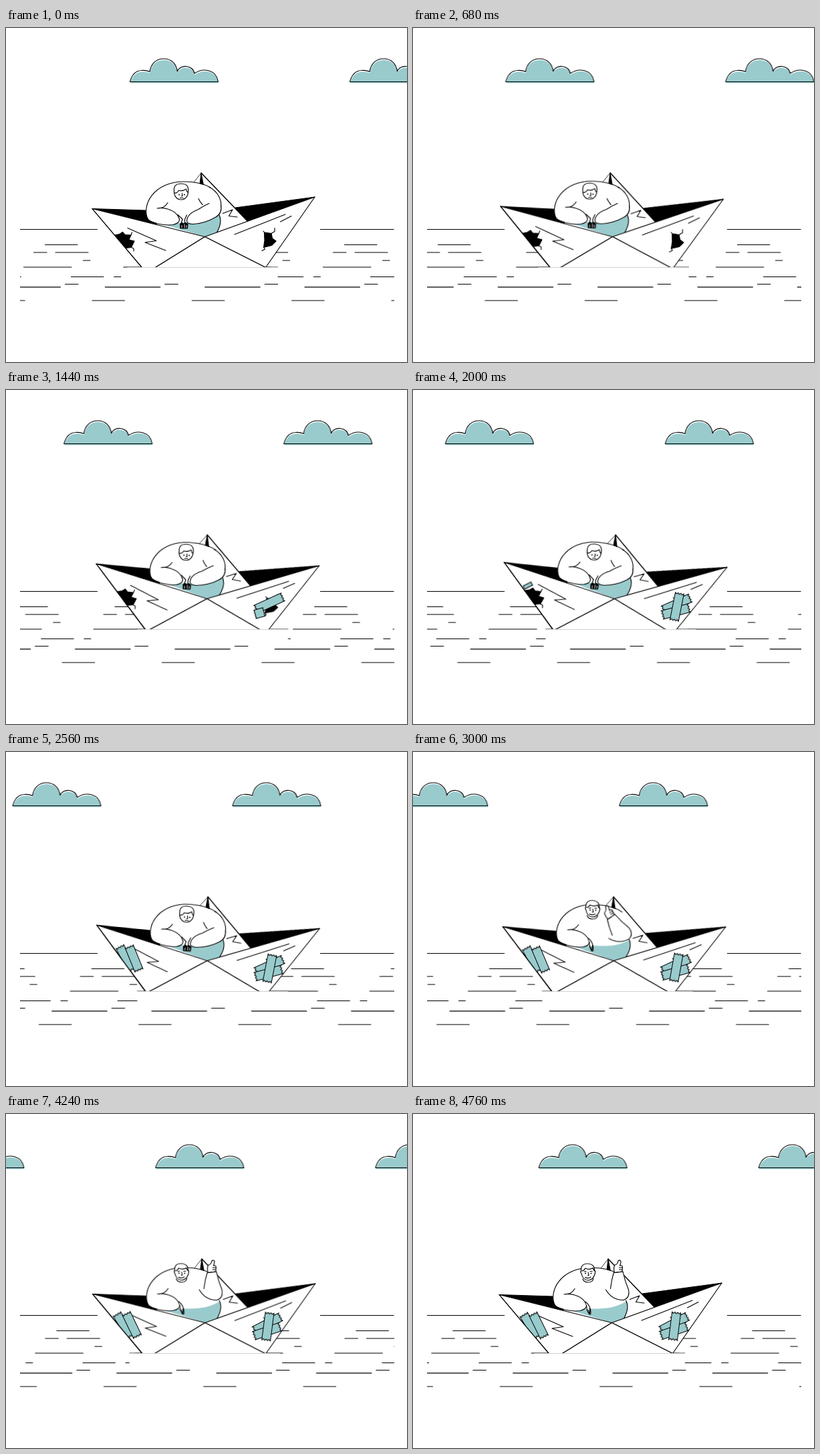
Animation, 600 px wide and 500 px high, one loop 4800 ms. Source, as an HTML page without scripts:

```html
<!DOCTYPE html>
<html lang="en">
<head>
<meta charset="utf-8">
<title>Paper boat</title>
<style>
  html, body { margin: 0; width: 100%; height: 100%; overflow: hidden; background: #fff; }
  svg { display: block; width: 600px; height: 500px; }
  .ink { fill: none; stroke: #000; stroke-width: 1.15; stroke-linejoin: round; stroke-linecap: round; }
  .paper { fill: #fff; }
  .teal { fill: #99cbcd; }
  .flat { stroke: none; }
  .black { fill: #000; }
  .thin { stroke-width: .8; }

  .clouds, .waves, .boat, .water, .working, .proud, .raise, .tape path {
    animation: 4.8s linear infinite;
  }
  .clouds { animation-name: clouds; }
  .waves { animation-name: waves; }
  .boat { animation-name: rock; transform-origin: 299.5px 366px; }
  .water { animation-name: water; }
  .working { animation-name: leave; animation-timing-function: step-end; }
  .proud { animation-name: arrive; animation-timing-function: step-end; }
  .raise { animation-name: raise; transform-origin: 317px 272px; }
  .tape path { vector-effect: non-scaling-stroke; }
  .t1 path { animation-name: t1; }
  .t2 path { animation-name: t2; }
  .t3 path { animation-name: t3; }
  .t4 path { animation-name: t4; }
  .t5 path { animation-name: t5; }

  @keyframes clouds { to { transform: translateX(-329px); } }
  @keyframes waves { to { transform: translateX(-149.333px); } }
  @keyframes rock {
    0% { transform: rotate(0); animation-timing-function: cubic-bezier(.33, 0, .67, 1); }
    41% { transform: rotate(4.25deg); animation-timing-function: cubic-bezier(.42, 0, .58, 1); }
    100% { transform: rotate(0); }
  }
  @keyframes water {
    0%, 100% { transform: none; }
    14.2% { transform: translateX(6px); }
    30% { transform: translateX(15.5px); }
    41% { transform: translateX(17.5px); }
    53.3% { transform: translateX(15.5px); }
    72.5% { transform: translateX(9px); }
    88.3% { transform: translateX(3.8px); }
  }
  @keyframes leave { 0% { opacity: 1; } 60%, 100% { opacity: 0; } }
  @keyframes arrive { 0% { opacity: 0; } 60%, 100% { opacity: 1; } }
  @keyframes raise { 0%, 60% { transform: rotate(-55deg); } 66%, 100% { transform: none; } }
  @keyframes t1 { 0%, 22% { transform: scaleX(0); } 28%, 100% { transform: none; } }
  @keyframes t2 { 0%, 28.5% { transform: scaleX(0); } 33%, 100% { transform: none; } }
  @keyframes t3 { 0%, 34% { transform: scaleX(0); } 39%, 100% { transform: none; } }
  @keyframes t4 { 0%, 41% { transform: scaleX(0); } 46%, 100% { transform: none; } }
  @keyframes t5 { 0%, 47% { transform: scaleX(0); } 52%, 100% { transform: none; } }
</style>
</head>
<body>
<svg viewBox="0 0 600 500" class="ink">
  <defs>
    <path id="puff" d="M185.5 80.5Q190 64 203 63.5Q210 63 215 65.5C217 53 225 46 236 46C248 46 255 54 256.5 65C260 54 280 55 282 68C295 59 315 62 317.500 80.500Z"/>
    <g id="cloud">
      <use href="#puff" class="teal flat" x=".4" y="2"/>
      <use href="#puff"/>
    </g>
    <path id="ripples" d="M58.500 324.500h48.500M41.500 336h19.500M74 336h49M115.500 348h10.500M26.500 358h71.500M97.500 372.500h48.500M161.700 372.500h10M-1 387.800h82.500M88.500 383.500h19.500M129 408h48.500"/>
    <path id="strip" d="M0-6.500H42l-2 2.200 2 2.100-2 2.200 2 2.200-2 2.100 2 2.200H0l2-2.200-2-2.100 2-2.200-2-2.200 2-2.100z"/>
    <clipPath id="sea"><path d="M21 290h559.500v130H21z"/></clipPath>
    <clipPath id="afloat"><path d="M0 0h600v357.900H0z"/></clipPath>
    <clipPath id="hull"><path d="M129 270.500L297.500 312.500L210.200 366.700Z"/></clipPath>
  </defs>

  <g class="clouds">
    <use href="#cloud"/>
    <use href="#cloud" x="329"/>
    <use href="#cloud" x="658"/>
  </g>

  <path stroke-linecap="butt" d="M21 301.500H137M470 301.500H580.500"/>
  <g clip-path="url(#sea)">
    <g class="waves">
      <use href="#ripples" x="-149.333"/>
      <use href="#ripples"/>
      <use href="#ripples" x="149.333"/>
      <use href="#ripples" x="298.667"/>
      <use href="#ripples" x="448"/>
      <use href="#ripples" x="597.333"/>
    </g>
  </g>

  <g class="water">
    <path class="paper flat" d="M181 357.500h225.500v20H181z"/>
    <path stroke-width=".6" d="M181 357.800h225.500"/>
  </g>

  <g clip-path="url(#afloat)">
    <g class="boat">
      <!-- far side and sail -->
      <path class="black" d="M129 270.500L225 273.500V294.500ZM343 269L462 253L361 290Z"/>
      <path class="paper thin" d="M292 217L270 245L297.500 312.500L361.500 289.500Z"/>
      <path d="M292 217L361.500 289.500"/>
      <path class="black" d="M292 217L296 238L289.800 236Z"/>
      <path d="M324.500 277.500L339 272L333.500 281.500L346 283"/>

      <!-- sailor -->
      <path class="paper flat" d="M213 287C200 266 222 230 266 230C300 230 322 246 322 268Q322 282 314 308H297Z"/>
      <path d="M213 288C201 265 222 230 266 230C282 230 296 233 306 239"/>
      <path class="teal flat" d="M213 287Q240 298 262 291Q298 294 320 280Q323 292 315 308L297.500 312.500Z"/>
      <path d="M318.500 279Q324.500 290 315.500 306"/>

      <g class="working">
        <path d="M304 238C317 245 323 257 321.500 268"/>
        <path class="paper flat" d="M270 289Q272 278 288 272L314 252Q327 270 318 280Q302 293 280 294Z"/>
        <path d="M321.500 265Q324 277 314 283Q299 292 281 293.500Q271 294 270.500 289Q271 278 287 272Q296 266 304 262.500M288 255.500Q290 260 294 264.500"/>
        <path d="M270.500 280L267.500 286.500V292"/>
        <path class="paper" d="M251.500 243C251 236 255 233 262 233S273 236 272.700 243C273 252 268 257 262 257S251 252 251.500 243Z"/>
        <path d="M252 247Q256 248 258.500 243Q264 245 269.500 241Q270 245 272.500 246.500M263.500 247.500L264 251.500H262.500M260.500 254.500Q263 253.500 265 254.500"/>
        <path stroke-width="1.8" d="M259 249.500h.1M267 249.500h.1"/>
      </g>

      <path class="paper flat" d="M212 277Q225 268 243 271Q257 275 260 286Q257 294 247 295Q226 294 213 287Z"/>
      <path d="M211 284Q214 290 224 292.500Q240 296 250 294.500Q260 292 259.500 286Q256 275 242 271Q234 268.500 226 270M242 261.500Q238 268 232 269.500"/>

      <g class="working">
        <path d="M257 279.500L264 286L262 293"/>
        <path class="black" d="M260.500 293.500L263.500 291.500L265.500 293.500L268.500 291.500L272 293.500L271.500 300H261Z"/>
        <path stroke="#fff" stroke-width=".9" d="M263 295.500V299M267 294V299M270 295.500V299"/>
      </g>

      <g class="proud">
        <path class="paper" d="M258 281Q266 287 266 298Q266 301 263.500 299.500L260.500 294L259.500 286"/>
        <path d="M262 293L264 299M264.500 291V299"/>
        <path class="paper" d="M254 247Q256 252 262 252Q269 252 270 246"/>
        <path class="paper" d="M251.500 234C251 227 255 224 261 224S272 227 271.500 234Q273.500 234 272 240Q269 249 261.500 249Q254 248 252 239Q250 236 251.500 234Z"/>
        <path d="M252 235Q256 235 257.500 231Q264 234 269 230.500Q270 234 272 235M262 237L263 241.500H261.500M257.500 244.500Q262 247 266 244M256 236L259 235.500M265 235.500L268 235.500"/>
        <path stroke-width="1.8" d="M258 238.500h.1M266.500 238.500h.1"/>
        <g class="raise">
          <path class="paper flat" d="M301 236L314 235Q318 250 323 263Q325 278 312 279Q296 277 288 263L295 262Z"/>
          <path d="M300.500 237Q297 248 295.500 261.500M314 236Q317 250 322.500 263Q325 275 315 278.500Q298 279 288.500 263"/>
          <path class="paper" d="M301.500 237.500Q299.500 230 302 226Q306 225.500 307 220Q309.500 217.500 311 220.500Q311 224 309.500 227Q313 226 313.500 229L313 236Z"/>
          <path d="M308.500 230H313M308.500 233H313M301.500 237.500L314 236"/>
        </g>
      </g>

      <!-- near side -->
      <path class="paper" d="M129 270.500L297.500 312.500L462 253L388.500 358.500L297.500 312.500L210.200 366.700Z"/>
      <path class="paper" d="M297.500 312.500L388.500 358.500L210.200 366.700Z"/>
      <path d="M182 299.500L225 318.500L208 321L239 333M342 309L418 279M410.500 290L427 281.500"/>

      <!-- tears -->
      <path class="black" d="M163 310L170 308.500L174.500 305.500L178 309.500L187 310L184 317L192 319L187.500 328.500L179 329.500Z"/>
      <path d="M187 310L188.500 306M187.500 328.500L191 330V334"/>
      <path class="black" d="M386.500 306L397 307.500L398.500 315L404 319L397.500 325.500L385.500 328.500L387 318Z"/>
      <path d="M397 307.500L402 304.500V299.500M386.500 306L385 304M385.500 328.500L387.500 331L383 333.500"/>

      <!-- patches -->
      <g class="teal">
        <g class="tape t1" transform="translate(371 324) rotate(-28)"><use href="#strip" visibility="hidden"/><path d="M0-6.500H45l-2 2.200 2 2.100-2 2.200 2 2.200-2 2.100 2 2.200H0l2-2.200-2-2.100 2-2.200-2-2.200 2-2.100z"/></g>
        <g class="tape t2" transform="translate(370.500 331.500) rotate(-19)"><path d="M0-6.500H42l-2 2.200 2 2.100-2 2.200 2 2.200-2 2.100 2 2.200H0l2-2.200-2-2.100 2-2.200-2-2.200 2-2.100z"/></g>
        <g class="tape t3" transform="translate(389 338.500) rotate(-83)"><path d="M0-6.500H42l-2 2.200 2 2.100-2 2.200 2 2.200-2 2.100 2 2.200H0l2-2.200-2-2.100 2-2.200-2-2.200 2-2.100z"/></g>
        <g clip-path="url(#hull)">
          <g class="tape t4" transform="translate(165.500 300) rotate(59)"><path d="M0-6.500H40l-2 2.200 2 2.100-2 2.200 2 2.200-2 2.100 2 2.200H0l2-2.200-2-2.100 2-2.200-2-2.200 2-2.100z"/></g>
        </g>
        <g class="tape t5" transform="translate(179.500 299) rotate(64)"><path d="M0-6.500H39l-2 2.200 2 2.100-2 2.200 2 2.200-2 2.100 2 2.200H0l2-2.200-2-2.100 2-2.200-2-2.200 2-2.100z"/></g>
      </g>
      <path d="M129 270.500L210.200 366.700"/>
    </g>
  </g>
</svg>
</body>
</html>
```
